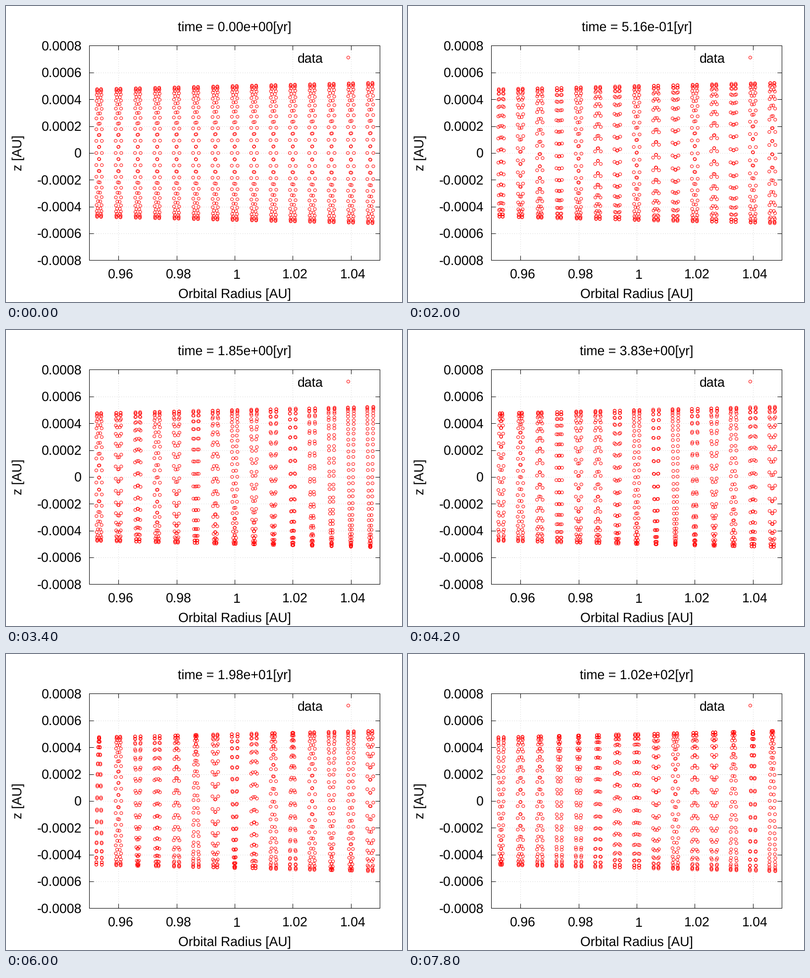
A matplotlib script that plays this animation: 800x600 px, repeating every 8 s.

```python
import numpy as np
import matplotlib.pyplot as plt
from matplotlib.animation import FuncAnimation

W, H, DPI = 800, 600, 100
# Just under the pixel centre, so that snapping keeps these lines in place
LEFT, RIGHT, TOP, BOTTOM = 168.49, 755.49, 80.49, 515.49
PX = 72 / DPI  # points per pixel

FRAMES, STEP = 40, 200
RINGS, PER_RING = 15, 66
ECC, INC = 0.001, 0.0005

plt.rcParams.update({
    "font.family": "Liberation Sans",
    "font.size": 26.67 * PX,
    "text.hinting": "none",
})

fig = plt.figure(figsize=(W / DPI, H / DPI), dpi=DPI, facecolor="white")
ax = fig.add_axes([LEFT / W, 1 - BOTTOM / H, (RIGHT - LEFT) / W, (BOTTOM - TOP) / H])
ax.set_xlim(0.95, 1.05)
ax.set_ylim(-0.0008, 0.0008)
ax.set_axisbelow(True)


def label(x, y, text, ha="center", **kw):
    """Place text with its baseline at pixel (x, y), y counted from the top."""
    return fig.text(x / W, 1 - y / H, text, ha=ha, va="baseline", **kw)


def circles(x, y, **kw):
    return ax.scatter(x, y, s=(6 * PX) ** 2, facecolors="none",
                      edgecolors="#ff0000", linewidths=PX, **kw)


# Axes, ticks and grid
x_ticks = [0.96, 0.98, 1, 1.02, 1.04]
y_ticks = np.arange(-8, 9, 2) * 1e-4
ax.set_xticks(x_ticks)
ax.set_yticks(y_ticks)
ax.tick_params(direction="in", length=9 * PX, width=PX, top=True, right=True,
               labelbottom=False, labelleft=False)
ax.grid(color="#b4b4b4", linewidth=0.7 * PX, linestyle=(0, (1.6, 5)))
for spine in ax.spines.values():
    spine.set_linewidth(PX)

for v in x_ticks:
    label(LEFT + (v - 0.95) / 0.1 * (RIGHT - LEFT) + 4.2, 553, f"{v:g}")
for v in y_ticks:
    y = TOP + (0.0008 - v) / 0.0016 * (BOTTOM - TOP)
    text = "0" if abs(v) < 1e-9 else f"{v:.4f}"
    label(153, y + 10, text, ha="right")

label(462, 592, "Orbital Radius [AU]")
label(32, 298, "z [AU]", rotation=90, rotation_mode="anchor")
title = label(462, 51.5, "")

# Legend
label(640.5, 115, "data", ha="right")
circles([691.5 / W], [1 - 104.5 / H], transform=fig.transFigure)

# Each ring: phase sets both the mean anomaly and the argument of pericentre
radius = 1 + (np.arange(RINGS)[:, None] - RINGS // 2) / 150
phase = 2 * np.pi * np.arange(PER_RING)[None, :] / PER_RING
dots = circles([], [], zorder=3)


def positions(t):
    m = phase + 2 * np.pi * t / radius ** 1.5
    r = radius * (1 - ECC * np.cos(m))
    z = r * INC * np.sin(phase + m + 2 * ECC * np.sin(m))
    return np.column_stack([r.ravel(), z.ravel()])


def update(i):
    t = 0.1 * 1.2 ** (i - 1) if i else 0.0
    dots.set_offsets(positions(t))
    title.set_text(f"time = {t:.2e}[yr]")
    return dots, title


anim = FuncAnimation(fig, update, frames=FRAMES, interval=STEP,
                     repeat=True, repeat_delay=0, blit=False)
plt.show()
```
